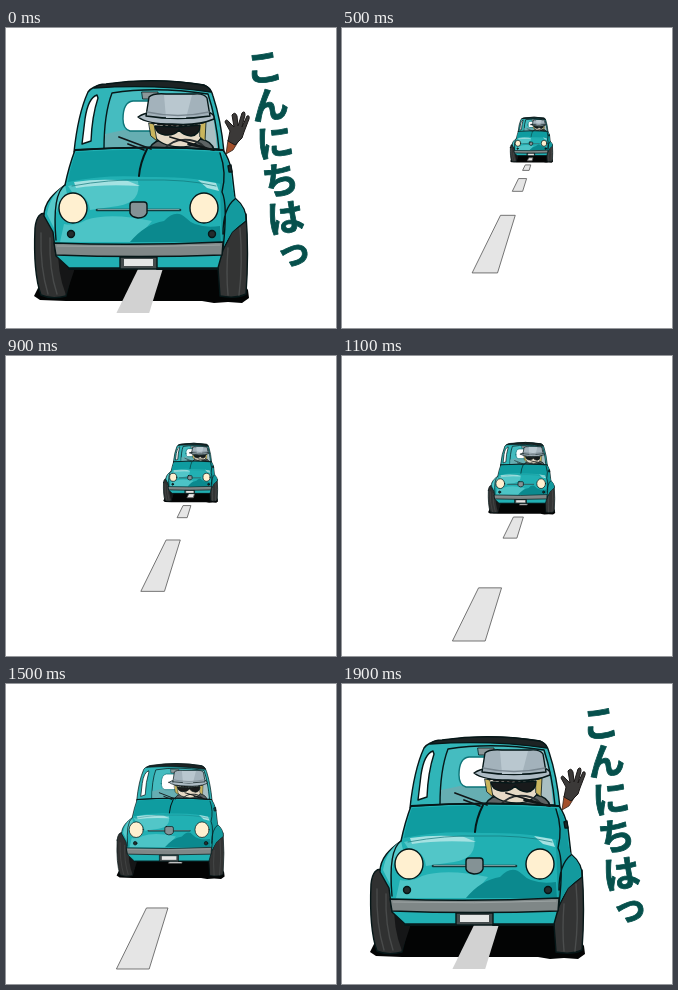
These frames come from a looping animation (330x300 px, 2 s). An HTML page:

```html
<!DOCTYPE html>
<html lang="ja">
<head>
<meta charset="utf-8">
<title>こんにちはっ</title>
<style>
  html, body { margin: 0; width: 100%; height: 100%; overflow: hidden; background: #fff; }
  svg { display: block; width: 100%; height: 100%; }
  #greeting { font: 700 38px "Noto Sans CJK JP", "Noto Sans CJK", sans-serif; writing-mode: vertical-rl; fill: #06504c; stroke: #06504c; stroke-width: .8; }
  .line { fill: none; }
  .plain { stroke: none; }
</style>
</head>
<body>
<svg viewBox="0 0 330 300">
  <path id="shadow" d="M44 236H226L242 262L243 270L236 275L222 274L208 275L196 273H60L34 272L28 268Z" fill="#030404"/>
  <g id="road" stroke-linejoin="round"></g>

  <g id="car" stroke="#061718" stroke-linejoin="round" stroke-linecap="round">
    <!-- wheels -->
    <path d="M29 200Q31 182 42 186L66 224V242L60 268Q46 272 35 267Q27 245 29 200Z" fill="#303131"/>
    <path d="M52 214L68 232V243L60 267Q51 245 52 214Z" fill="#151617" class="plain"/>
    <path d="M35 205Q34 240 42 266M44 210Q43 242 51 266" class="line" stroke="#484a4a"/>
    <path d="M211 226L224 200Q234 181 240 186Q243 225 240 266Q230 271 214 268Z" fill="#333434"/>
    <path d="M234 200Q237 235 233 267M222 220Q220 245 222 267" class="line" stroke="#4b4d4d"/>

    <!-- cabin -->
    <path d="M68 124Q72 86 82 64Q86 58 98 57Q148 49 198 57Q205 60 207 68Q215 92 218 124Z" fill="#30b5b8"/>
    <path d="M88 60Q92 56 100 56Q148 49 197 57Q204 59 205 64Q150 56 88 60Z" fill="#1c2324"/>
    <path d="M91 67Q82 70 79 91L76 116L85 113Q86 88 92 70Z" fill="#fff"/>
    <path d="M98 121Q98 86 106 65Q150 58 202 66Q210 90 213 121Z" fill="#45bcc0"/>
    <path d="M99 106L118 102L150 104V121H99Z" fill="#66aeb2" class="plain"/>
    <path d="M117 91Q117 74 127 73H147V103H124Q117 101 117 91Z" fill="#fff" stroke="#0d7478"/>
    <path d="M136 64H152V71H137Z" fill="#8b9799" stroke-width=".8"/>
    <path d="M151 66L201 67Q209 90 211 120H150Z" fill="#a9bfc3" class="plain"/>

    <!-- driver -->
    <path d="M143 121Q148 111 162 111H194Q206 113 208 122Z" fill="#5d6364"/>
    <path d="M146 92H197V107Q191 119 174 119Q153 118 147 106Z" fill="#e6dac6"/>
    <path d="M143 95L148 96L151 113L145 108ZM194 94H200L199 113L194 109Z" fill="#c9b55e" stroke-width=".8"/>
    <path d="M149 94Q172 99 197 93" class="line" stroke="#171717" stroke-width="5"/>
    <path d="M149 97Q172 101 196 96" class="line" stroke="#efe8d8" stroke-width="1.8" stroke-dasharray="1.5 4"/>
    <path d="M149 98L171 99L194 97Q194 107 185 108Q177 107 173 102Q168 108 159 107Q150 106 149 98Z" fill="#181a1b"/>
    <path d="M132 89Q138 85 144 85Q172 91 200 84Q209 85 208 91Q192 98 166 96Q141 96 132 89Z" fill="#aebcc5"/>
    <path d="M140 88L143 69Q147 65 160 66H188Q198 65 201 70L204 88Q172 93 140 88Z" fill="#a3b2bb"/>
    <path d="M158 67L186 67L180 90L160 90Z" fill="#b9c7cf" class="plain"/>
    <path d="M141 84Q172 91 203 84" class="line" stroke="#78868f"/>
    <path d="M158 122Q166 110 184 112Q196 114 200 122" class="line" stroke="#2a3031" stroke-width="2"/>

    <!-- bodywork -->
    <path d="M69 122Q63 138 59 157C48 165 38 174 38 188L47 204L50 228L63 240H212L217 222L226 204L240 193Q241 180 229 170L226 144Q223 130 217 122Q145 117 69 122Z" fill="#21b0b3"/>
    <path d="M59 157Q44 167 41 186L48 200Q49 176 61 166Z" fill="#55c9ca" class="plain"/>
    <path d="M217 125Q225 134 226 160L229 171Q240 180 239 192L226 204L216 221L214 160Z" fill="#139a9e" class="plain"/>
    <path d="M70 124Q64 140 62 154Q100 146 140 149Q186 148 215 156Q219 138 214 124Q140 119 70 124Z" fill="#0f9ca0" class="plain"/>
    <path d="M62 158Q98 150 132 153Q136 174 112 178L84 182Q82 166 66 164Z" fill="#52c6c8" class="plain"/>
    <path d="M80 192Q104 184 146 193L128 214H54L58 196Q70 198 80 192Z" fill="#4cc4c6" class="plain"/>
    <path d="M68 154Q96 150 122 153L134 158Q96 156 70 160ZM192 152L210 155L213 163L201 160Z" fill="#a5e2e2" class="plain"/>
    <path d="M124 214Q139 196 158 193Q170 180 180 190Q190 201 214 198L215 214Z" fill="#0b898e" class="plain"/>
    <path d="M69 122Q145 117 217 122" class="line" stroke-width="2.2"/>
    <path d="M66 158Q104 151 137 152Q182 151 210 158" class="line" stroke-width=".7" stroke="#127679"/>
    <path d="M141 121Q134 135 133 148" class="line" stroke-width="2"/>
    <path d="M59 157Q46 166 50 212M214 125Q221 145 216 164Q222 176 217 221M229 171Q217 180 217 206" class="line"/>
    <path d="M113 109L145 121M122 116L138 122M164 109L201 120M182 116L208 122" class="line" stroke="#111718" stroke-width="1.8"/>
    <path d="M222 138L225 137L226 144L223 144Z" fill="#20292a"/>

    <!-- lights and trim -->
    <path d="M91 182H174" class="line" stroke="#143b3d" stroke-width="2.6"/>
    <path d="M92 181.5H173" class="line" stroke="#8fb0b1" stroke-width=".8"/>
    <path d="M127 174H138Q141 174 141 177V185Q139 190 132 190Q125 189 124 185V177Q124 174 127 174Z" fill="#849295"/>
    <g fill="#fff0d0">
      <ellipse cx="67" cy="180" rx="14" ry="15"/>
      <ellipse cx="198" cy="180" rx="14" ry="15"/>
    </g>
    <g fill="#242c2d">
      <circle cx="65" cy="206" r="3.5"/>
      <circle cx="206" cy="206" r="3.5"/>
    </g>
    <path d="M48 215Q132 218 217 214L216 227Q132 230 50 227Z" fill="#7f8787"/>
    <path d="M51 218Q132 220 214 217" class="line" stroke="#a5adad" stroke-width=".8"/>
    <path d="M114 229H151V241H114Z" fill="#444c4d"/>
    <path d="M118 231H147V238H118Z" fill="#e4e6e5" class="plain"/>
    <path d="M63 241H114M151 241H212" class="line" stroke-width="2"/>
  </g>

  <g id="hello" stroke-linejoin="round">
    <path d="M220 126L222 112L227 109L232 114L227 122Z" fill="#a34f2b" stroke="#33251c" stroke-width=".8"/>
    <path d="M222 113L224 103L219 94Q220 90 223 94L228 99L226 87Q229 83 231 88L232 98L236 85Q239 82 239 87L236 99L241 88Q244 87 243 91L238 104L236 110L229 117Z" fill="#3b3938" stroke="#1b1817"/>
    <text id="greeting" transform="translate(255.5 20) rotate(-8)">こんにちはっ</text>
  </g>
</svg>
<script>
const byId = id => document.getElementById(id);
const car = byId("car"), shadow = byId("shadow"), road = byId("road"), hello = byId("hello");
const lerp = (a, b, k) => a + (b - a) * k;

// Step, then the car's left, top, right and bottom edges.
const poses = [
  [1, 173, 91, 210, 131],
  [5, 168, 89, 211, 135],
  [9, 157, 87, 212, 147],
  [12, 138, 85.5, 214, 167],
  [13, 130, 82, 215, 175],
  [17, 75, 74, 225, 232],
  [18, 46, 61, 236, 260],
  [19, 27, 52, 243, 276]
];

// Approach at constant speed in depth between poses.
function carBox(step) {
  const i = Math.max(1, poses.findIndex(p => p[0] >= step));
  const a = poses[i - 1], b = poses[i];
  const wa = a[3] - a[1], wb = b[3] - b[1];
  const width = 1 / lerp(1 / wa, 1 / wb, (step - a[0]) / (b[0] - a[0]));
  const k = (width - wa) / (wb - wa);
  return [1, 2, 3, 4].map(n => lerp(a[n], b[n], k));
}

function drawCar(step) {
  const [left, top, right, bottom] = carBox(step);
  const sx = (right - left) / 216, sy = (bottom - top) / 224;
  const place = `translate(${left} ${top}) scale(${sx} ${sy}) translate(-27 -52)`;
  car.setAttribute("transform", place);
  shadow.setAttribute("transform", place);
  car.setAttribute("stroke-width", Math.max(1.4, .7 / sx));
}

const horizon = { x: 198, y: 107 };
const gap = .0105, dash = .0052, nearest = 1 / 178;
const stripes = Array.from({ length: 9 }, () =>
  road.appendChild(document.createElementNS("http://www.w3.org/2000/svg", "polygon")));

function drawRoad(step) {
  const travel = .00671 - .00249 * (step - 1);
  const phase = ((travel % gap) + gap) % gap;
  stripes.forEach((stripe, i) => {
    const near = phase + (i - 1) * gap, far = near + dash;
    const visible = far > nearest;
    stripe.style.display = visible ? "" : "none";
    if (!visible) return;
    const d0 = 1 / far, d1 = 1 / Math.max(near, nearest);
    const point = (d, slope) => `${horizon.x - slope * d},${horizon.y + d}`;
    stripe.setAttribute("points",
      [point(d0, .492), point(d0, .308), point(d1, .308), point(d1, .492)].join(" "));
  });
  const close = step >= 17;
  road.setAttribute("fill", close ? "#d2d2d2" : "#e5e5e5");
  road.setAttribute("stroke", close ? "none" : "#555");
  road.setAttribute("stroke-width", ".8");
}

let shown = -1;
function frame(now) {
  const step = Math.floor(now % 2000 / 100) || 19;
  if (step !== shown) {
    drawCar(step);
    drawRoad(step);
    hello.style.display = step === 19 ? "" : "none";
    shown = step;
  }
  requestAnimationFrame(frame);
}
frame(performance.now());
</script>
</body>
</html>
```
